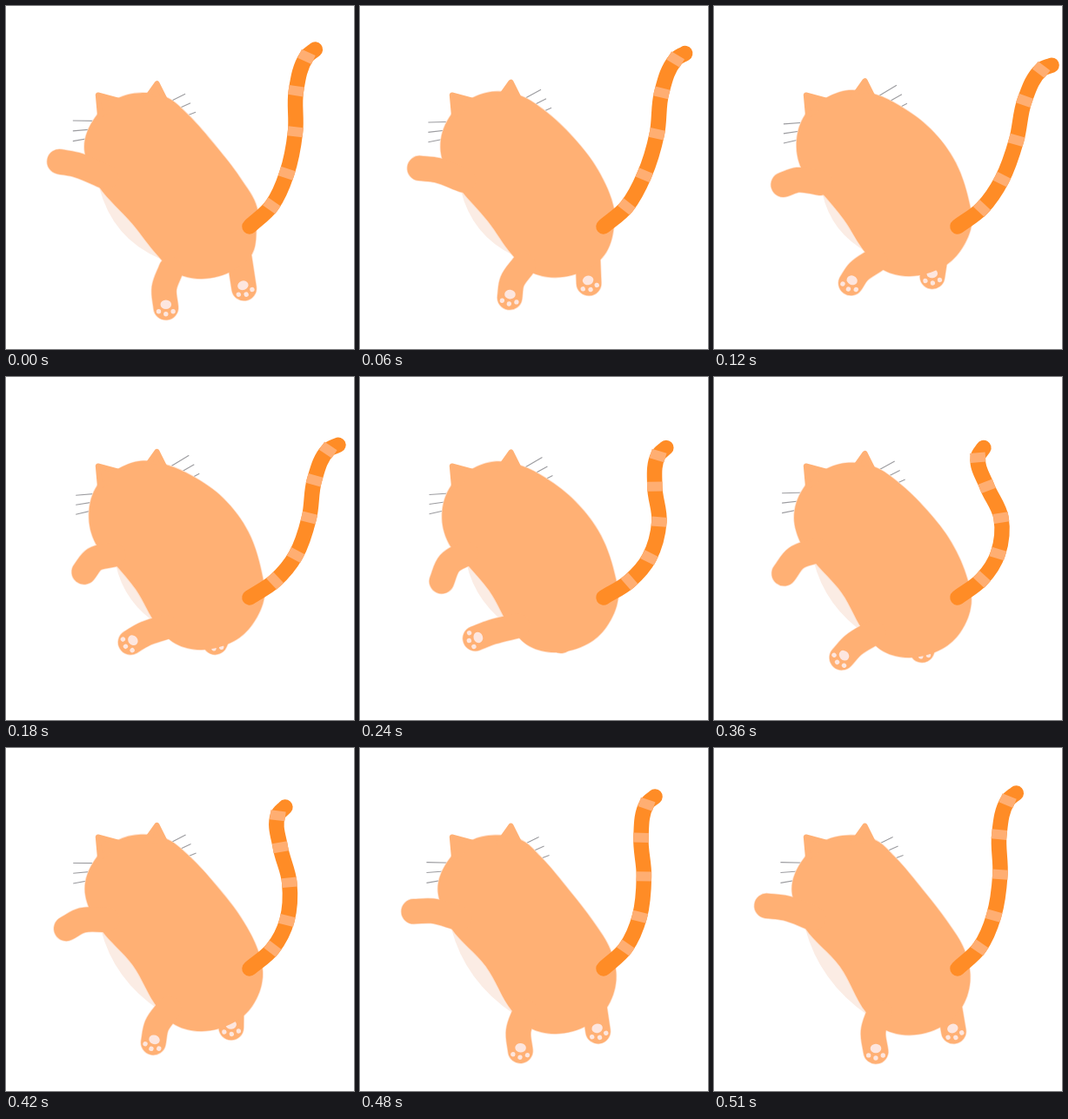
Write an HTML page with a canvas that moves like this. It is 400 px wide and 395 px high and loops after 0.54 s.

```html
<!DOCTYPE html>
<html lang="en">
<head>
<meta charset="utf-8">
<title>Orange cat</title>
<style>
html, body { margin: 0; width: 100%; height: 100%; overflow: hidden; background: #fff; }
canvas { display: block; }
</style>
</head>
<body>
<canvas id="stage" width="400" height="395"></canvas>
<script>
const ctx = document.getElementById('stage').getContext('2d');
const FUR = '#ffb074', RIM = '#ffdfca', PALE = '#fbece4', PAD = '#fde6df';
const TAIL = '#ff8c26', BAND = '#ffae72';
const LOOP = 540, STEP = 30, RAD = Math.PI / 180;

// Periodic motion: a mean plus the first two harmonics of the loop.
function wave(t, mean, cos1, sin1, cos2 = 0, sin2 = 0) {
  const a = t / LOOP * 2 * Math.PI;
  return mean + cos1 * Math.cos(a) + sin1 * Math.sin(a)
    + cos2 * Math.cos(2 * a) + sin2 * Math.sin(2 * a);
}

// Smooth curve whose handles follow the bisector of neighbouring segments.
function spline(points, closed) {
  const n = points.length, path = new Path2D();
  const p = i => closed ? points[(i + n) % n] : points[Math.max(0, Math.min(n - 1, i))];
  const gap = (a, b) => Math.hypot(b[0] - a[0], b[1] - a[1]);
  const unit = (a, b) => {
    const d = gap(a, b) || 1;
    return [(b[0] - a[0]) / d, (b[1] - a[1]) / d];
  };
  const tangent = i => {
    const u = unit(p(i - 1), p(i)), v = unit(p(i), p(i + 1));
    return unit([0, 0], [u[0] + v[0], u[1] + v[1]]);
  };
  path.moveTo(...p(0));
  for (let i = 0; i < (closed ? n : n - 1); i++) {
    const a = p(i), b = p(i + 1), u = tangent(i), v = tangent(i + 1), h = gap(a, b) * .35;
    path.bezierCurveTo(a[0] + u[0] * h, a[1] + u[1] * h, b[0] - v[0] * h, b[1] - v[1] * h, ...b);
  }
  return path;
}

// Two ends and a joint pushed away from their midpoint.
function limb([x1, y1], [x2, y2], dx, dy) {
  return spline([[x1, y1], [(x1 + x2) / 2 + dx, (y1 + y2) / 2 + dy], [x2, y2]]);
}

function polygon(points) {
  const path = new Path2D();
  points.forEach(p => path.lineTo(...p));
  path.closePath();
  return path;
}

function line(x1, y1, x2, y2) {
  const path = new Path2D();
  path.moveTo(x1, y1);
  path.lineTo(x2, y2);
  return path;
}

function stroke(path, color, width, cap = 'round') {
  ctx.strokeStyle = color;
  ctx.lineWidth = width;
  ctx.lineCap = cap;
  ctx.lineJoin = 'round';
  ctx.stroke(path);
}

function fill(path, color) {
  ctx.fillStyle = color;
  ctx.fill(path);
}

function pads([x, y], degrees) {
  ctx.save();
  ctx.translate(x, y);
  ctx.rotate(degrees * RAD);
  const path = new Path2D();
  const oval = (cx, cy, rx, ry) => {
    path.moveTo(cx + rx, cy);
    path.ellipse(cx, cy, rx, ry, 0, 0, 7);
  };
  oval(-3.5, 0, 5.3, 6.3);
  for (const side of [-1, 0, 1]) oval(7.5 - 3 * Math.abs(side), 8.3 * side, 2.7, 2.7);
  fill(path, PAD);
  ctx.restore();
}

function drawWhiskers(k) {
  for (let i = 0; i < 3; i++) {
    const left = line(76 + 4 * k, 131 + 12 * i + (5 - i) * k, 106, 132 + 9 * i + 2 * k);
    const right = line(205 + 6 * i + 5 * k, 104 + 10.5 * i - 13 * k,
      182 + 9 * i + 3 * k, 115 + 8 * i - 9 * k);
    [left, right].forEach(whisker => stroke(whisker, '#9b9b9f', 1.1, 'butt'));
  }
}

// Each segment: length, then the wave of its heading in degrees.
const tailSegments = [
  [35, 38, 5.4, -2],
  [41, 58, 7, -4],
  [49, 78, .5, -8.4],
  [47, 95, -8.4, -14.6, 2.3, 4],
  [41, 82, -11, -18.6, 2, 5.5],
  [13, 42, -7, -14.5, 5, 4.5]
];

function drawTail(t) {
  const stretch = wave(t, .926, .075, .048);
  const points = [[280, 254]];
  tailSegments.forEach(([length, ...heading], i) => {
    const [x, y] = points[i], angle = wave(t, ...heading) * RAD;
    const reach = i % 5 ? length * stretch : length;
    points.push([x + reach * Math.cos(angle), y - reach * Math.sin(angle)]);
  });
  stroke(spline(points), TAIL, 17.5);
  for (let i = 1; i < points.length - 1; i++) {
    const [x, y] = points[i], a = points[i - 1], b = points[i + 1];
    const angle = Math.atan2(b[1] - a[1], b[0] - a[0]);
    const dx = 5.5 * Math.cos(angle), dy = 5.5 * Math.sin(angle);
    stroke(line(x - dx, y - dy, x + dx, y + dy), BAND, 17.5, 'butt');
  }
}

function draw(t) {
  const k = wave(t, .6, -.29, .33, -.1, .03); // how far the back is hunched
  const bottom = 311 + Math.max((120 - t) / 40, (t - 120) / 20);
  const hipX = Math.min(294 + 3 * k, 288 + t / 14);
  const hand = [wave(t, 77.3, -15.8, 5.3), wave(t, 210, -28.8, -1.1, -2)];
  const paw = [wave(t, 158, 26.6, -5.1, -.8, -2.9), wave(t, 325.3, 22, -10.2)];
  const farPaw = [wave(t, 251, 22.6, -2.8, 0, -3.5), wave(t, 315, 10.1, -5.3)];

  const chest = [102 + 23 * k, 206 + 10 * k];
  const body = spline([
    [89 + 6 * k, 158], [105, 125], [127, 107], [155, 101 - 4 * k], [186, 107 - 5 * k],
    [207 + 7 * k, 127 - 12 * k], [240 + 9 * k, 168 - 27 * k], [267 + 11 * k, 203 - 23 * k],
    [287 + 8 * k, 233], [hipX, bottom - 62], [283, bottom - 29], [262, bottom - 10],
    [225, bottom], [195, bottom - 7], [175, bottom - 26],
    [144 + 5 * k, 252 - 7 * k], chest, [95 + 8 * k, 188 + 4 * k]
  ], true);
  const ears = [
    polygon([[105.8, 102.5], [108, 127], [130, 109]]),
    polygon([[173.5, 90 - 4 * k], [160, 109 - 4 * k], [182, 107 - 4 * k]])
  ];
  const limbs = [
    limb(hand, [113 + 10 * k, 195 + 9 * k], -5, -4.5),
    limb(paw, [158 + .173 * paw[0], 178 + .36 * paw[1]], -5, 0)
  ];
  const farLeg = line(...farPaw, 117 + .55 * farPaw[0], 285);
  const belly = new Path2D();
  belly.moveTo(...chest);
  belly.quadraticCurveTo(119 + 16 * k, 270 - 9 * k, 177, bottom - 22 - 5 * k);
  belly.lineTo(190, 235);
  belly.closePath();

  ctx.clearRect(0, 0, 400, 395);
  drawWhiskers(k);
  fill(belly, PALE);
  [farLeg, ...limbs].forEach(path => stroke(path, RIM, 30));
  stroke(body, RIM, 1.8);
  stroke(farLeg, FUR, 28.5);
  pads(farPaw, wave(t, 90, -20, 0));
  fill(body, FUR);
  ears.forEach(ear => { fill(ear, FUR); stroke(ear, FUR, 6); });
  limbs.forEach(path => stroke(path, FUR, 28.5));
  pads(paw, wave(t, 122, -37, 2, 5));
  drawTail(t);
}

const start = performance.now();
function tick() {
  const elapsed = (performance.now() - start) % LOOP;
  draw(Math.floor(elapsed / STEP) * STEP);
  requestAnimationFrame(tick);
}
tick();
</script>
</body>
</html>
```
